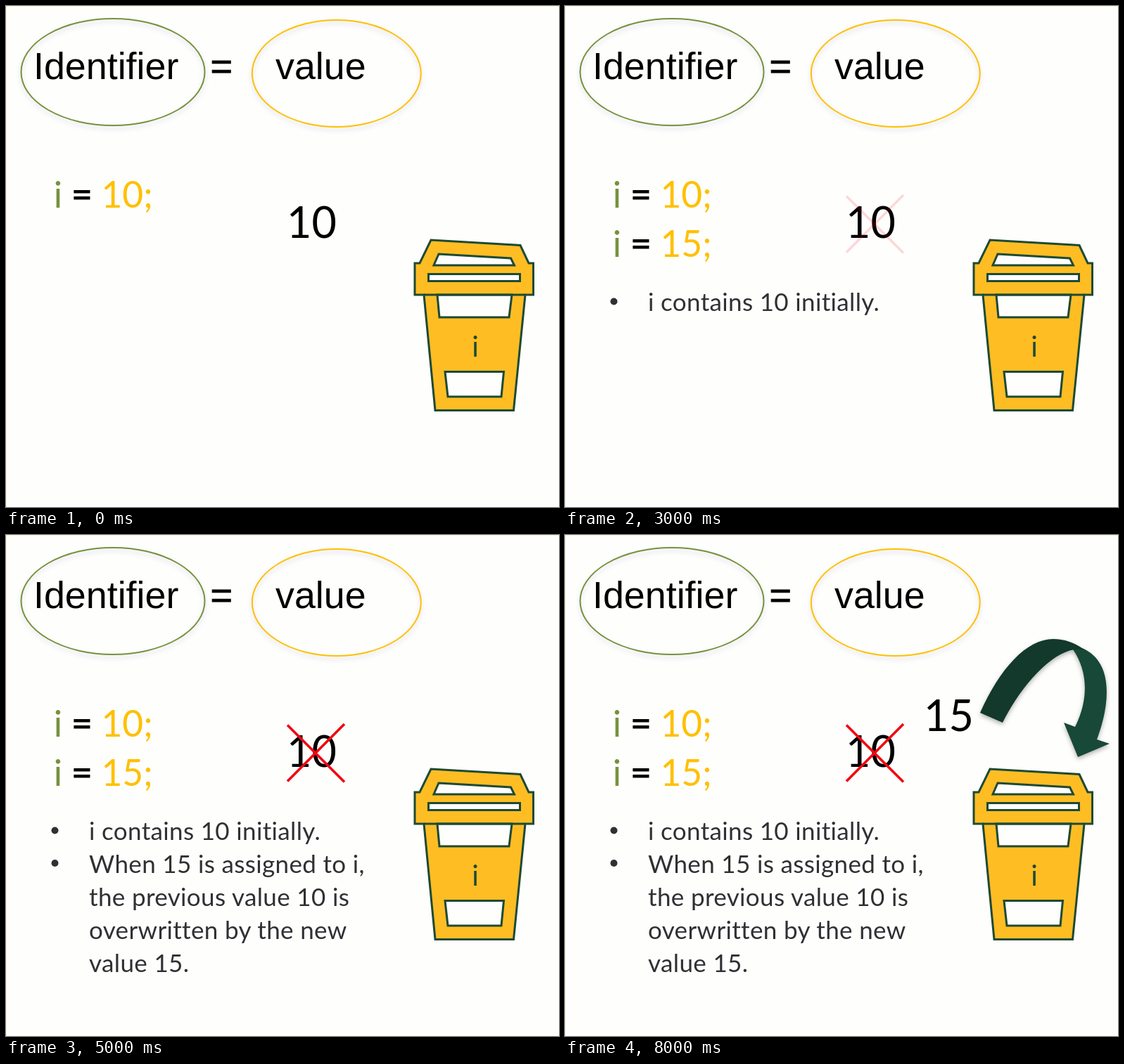
Recreate the animation shown at these times as an HTML page. Size 786 px wide and 713 px high, loop 8600 ms.

```html
<!DOCTYPE html>
<html lang="en">
<head>
<meta charset="utf-8">
<title>Assigning a value</title>
<style>
  html, body { margin: 0; width: 100%; height: 100%; overflow: hidden; background: #fefefd; }
  svg { display: block; width: 786px; height: 713px; }
  text { font-family: Lato, sans-serif; white-space: pre; }
  .title { font: 53.8px "Liberation Sans", Arial, sans-serif; }
  .code { font-size: 51.5px; }
  .number { font-size: 61px; }
  .note { font-size: 35px; letter-spacing: .35px; fill: #303034; }
  .mid { text-anchor: middle; }
  .equals { stroke: #000; stroke-width: .9; }
  .green { fill: #76923c; }
  .gold { fill: #ffc000; }
  .oval { fill: none; stroke-width: 2; filter: drop-shadow(0 4px 3px rgba(80, 70, 130, .22)); }
  .cup { stroke: #1d4a35; stroke-width: 3; }
</style>
</head>
<body>
<svg viewBox="0 0 786 713">
  <path d="M.5 713V.5H786" fill="none" stroke="#fff2cf"/>

  <ellipse class="oval" cx="152" cy="94" rx="130.5" ry="76" stroke="#76923c"/>
  <ellipse class="oval" cx="469.8" cy="96" rx="120" ry="76" stroke="#ffc000"/>
  <text class="title" x="39" y="104">Identifier</text>
  <text class="title equals" x="290.5" y="104">=</text>
  <text class="title" x="383" y="104">value</text>

  <g class="code">
    <text class="green mid" x="74" y="287">i</text>
    <text class="mid equals" x="108" y="287">=</text>
    <text class="gold" x="135.5" y="287">10;</text>
  </g>
  <g class="code" id="second">
    <text class="green mid" x="74" y="357">i</text>
    <text class="mid equals" x="108" y="357">=</text>
    <text class="gold" x="135.5" y="357">15;</text>
  </g>

  <text class="number" x="399" y="329.5">10</text>
  <path id="cross" d="M400 270.5L481 351.5M481 269L400 350.5" stroke="#f20610" stroke-width="3.6"/>
  <text class="number" id="fifteen" x="510" y="278.5">15</text>

  <g class="note" id="note1">
    <circle cx="69.5" cy="420.5" r="5"/>
    <text x="118" y="434">i contains 10 initially.</text>
  </g>
  <g class="note" id="note2">
    <circle cx="69.5" cy="467" r="5"/>
    <text x="118" y="481">When 15 is assigned to i,</text>
    <text x="118" y="528">the previous value 10 is</text>
    <text x="118" y="575">overwritten by the new</text>
    <text x="118" y="621.5">value 15.</text>
  </g>

  <g class="cup">
    <path fill="#ffbd24" d="M581 366H588L604 333L731 340.5L743 366H749.5V411H738L721.5 575.5H610L594 411H581Z"/>
    <path fill="#fefefd" d="M615 353L717.5 359L722.5 369H608Z M600.5 381.5H730.5V391.5H600.5Z
      M613 411H719L715 443H616Z M624 520.5H707.5L704 556H628Z"/>
    <path d="M594 411H738"/>
  </g>
  <text class="mid" x="667" y="499" font-size="40" fill="#1d4a35">i</text>

  <g id="arrow" style="filter: drop-shadow(0 3px 3px rgba(0, 0, 0, .3))">
    <path fill="#174838" d="M722 163L735 161C776 178 778 232 756 291L774 297L729 316L709 267L725 273C744 235 744 195 722 163Z"/>
    <path fill="#12392c" d="M590 253C618 190 656 148 694 148Q717 148 738 163L724 163C690 168 648 215 622 267Z"/>
  </g>
</svg>
<script>
  const LOOP = 8600, STEP = 200, RISE = 98;
  const byId = id => document.getElementById(id);

  // Progress is already `lead` when the part first shows.
  const progress = (t, start, lead, duration) =>
    t < start ? 0 : Math.min(1, lead + (t - start) / duration);

  function fade(id, p) {
    byId(id).setAttribute("opacity", p);
  }

  function floatUp(id, p) {
    fade(id, p);
    byId(id).setAttribute("transform", `translate(0 ${RISE * (1 - p)})`);
  }

  function growAndTurn(id, p, x, y) {
    fade(id, p);
    byId(id).setAttribute("transform",
      `translate(${x} ${y}) rotate(${90 * (1 - p)}) scale(${p}) translate(${-x} ${-y})`);
  }

  function draw(now) {
    const t = Math.floor(now % LOOP / STEP) * STEP;
    floatUp("note1", progress(t, 200, .18, 950));
    growAndTurn("second", progress(t, 1600, .13, 950), 140, 342);
    fade("cross", progress(t, 3000, .15, 500));
    floatUp("note2", progress(t, 4000, .07, 950));
    floatUp("fifteen", progress(t, 5800, .1, 950));
    fade("arrow", progress(t, 7600, .2, 500));
  }

  const began = performance.now();
  function frame() {
    draw(performance.now() - began);
    requestAnimationFrame(frame);
  }
  frame();
</script>
</body>
</html>
```
